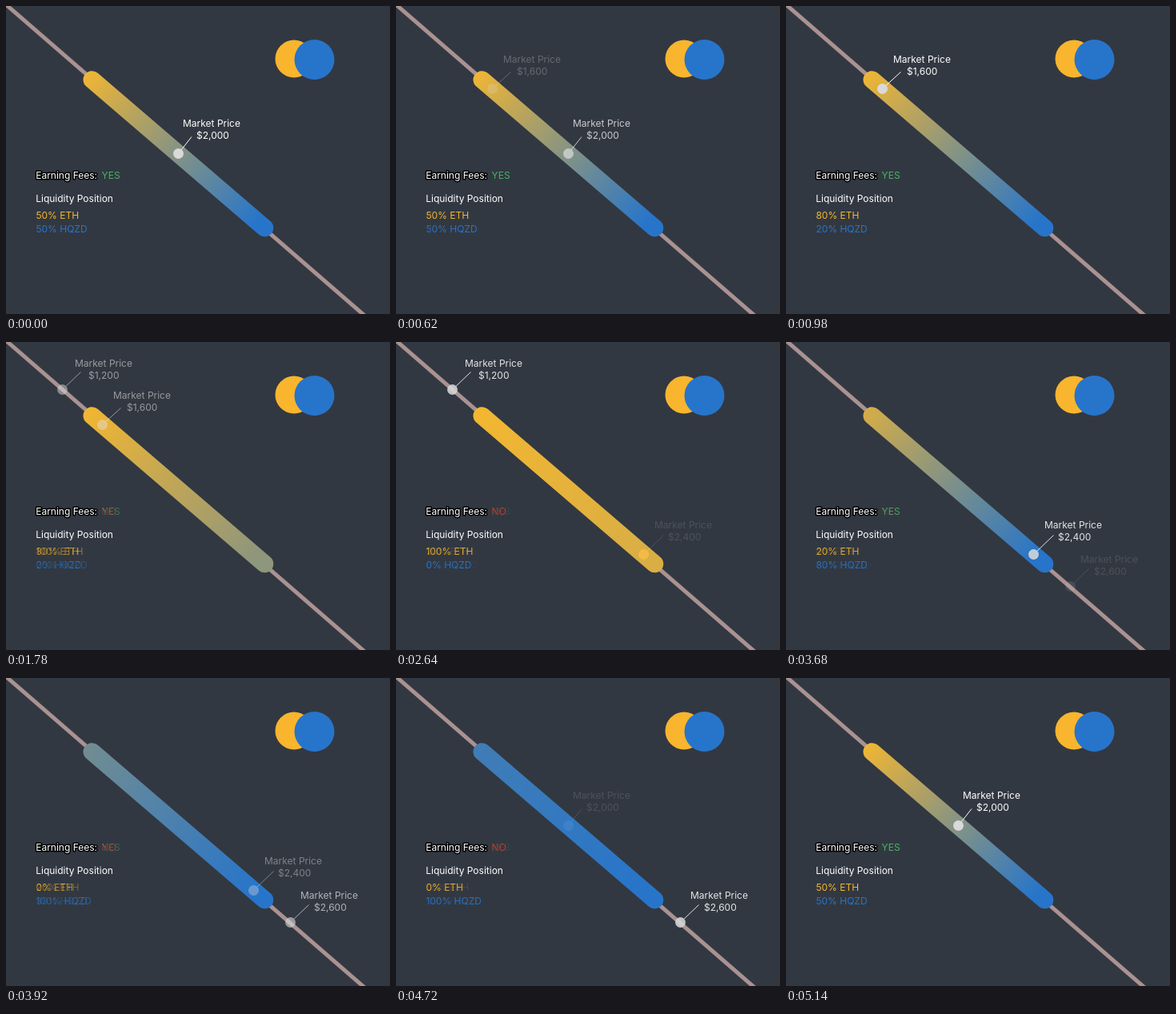
Write an HTML page with a canvas that moves like this. It is 480x385 px and loops after 5.2 s.

```html
<!DOCTYPE html>
<html lang="en">
<head>
<meta charset="utf-8">
<title>Liquidity range</title>
<style>
  html, body { margin: 0; width: 100%; height: 100%; overflow: hidden; background: #323841; }
  canvas { display: block; }
</style>
</head>
<body>
<canvas id="stage" width="480" height="385"></canvas>
<script>
const W = 480, H = 385;
const YELLOW = '#f4b731', BLUE = '#2775ca', GREEN = '#46b263', RED = '#c93a27';
const STATE_MS = 1040, HOLD_MS = 560, STEP_MS = 60, STEPS = 8;

// dot: marker centre, label: text origin, tip: outer end of the leader
const states = [
  { price: '$2,000', eth: 50,  dot: [215.5, 184.5], label: [221, 151], tip: [232, 163.5] },
  { price: '$1,600', eth: 80,  dot: [120.5, 103.5], label: [134, 71],  tip: [143.5, 82.5] },
  { price: '$1,200', eth: 100, dot: [70.5, 59.5],   label: [86, 31],   tip: [93.5, 37.5] },
  { price: '$2,400', eth: 20,  dot: [309.5, 265.5], label: [323, 233], tip: [334.5, 241.5] },
  { price: '$2,600', eth: 0,   dot: [355.5, 305.5], label: [368, 276], tip: [378.5, 283.5] }
];

const main = document.getElementById('stage').getContext('2d');
const layer = document.createElement('canvas');
layer.width = W;
layer.height = H;
const over = layer.getContext('2d');

function line(c, from, to, width, color, cap = 'butt') {
  c.lineWidth = width;
  c.strokeStyle = color;
  c.lineCap = cap;
  c.beginPath();
  c.moveTo(...from);
  c.lineTo(...to);
  c.stroke();
}

function disc(c, x, y, r, color) {
  c.fillStyle = color;
  c.beginPath();
  c.arc(x, y, r, 0, Math.PI * 2);
  c.fill();
}

function text(c, str, x, y, color = '#fff') {
  c.fillStyle = color;
  c.fillText(str, x, y);
}

function barColor(c, eth) {
  if (eth === 100) return YELLOW;
  if (eth === 0) return BLUE;
  const g = c.createLinearGradient(95, 81, 314, 269);
  g.addColorStop(0, YELLOW);
  g.addColorStop(1, BLUE);
  return g;
}

function drawState(c, { price, eth, dot, label: [x, y], tip }) {
  const earning = eth > 0 && eth < 100;
  c.fillStyle = '#323841';
  c.fillRect(0, 0, W, H);
  c.font = '12px Inter, sans-serif';
  c.lineJoin = 'round';

  line(c, [-9.5, -10], [457.5, 395], 5, '#aa9292');
  line(c, [107.5, 92.2], [323.3, 277.3], 22, barColor(c, eth), 'round');

  disc(c, 360, 66, 23.5, '#f9b52e');
  disc(c, 385.5, 67, 25, BLUE);

  line(c, tip, dot, 1, '#fff');
  disc(c, ...dot, 6.5, '#d9d9d9');
  text(c, 'Market Price', x, y);
  text(c, price, x + 17, y + 15);

  c.lineWidth = 3;
  c.strokeStyle = '#000';
  c.strokeText('Earning Fees:', 37.2, 216);
  text(c, 'Earning Fees:', 37.2, 216);
  text(c, earning ? 'YES' : 'NO', 119.6, 216, earning ? GREEN : RED);
  text(c, 'Liquidity Position', 37.2, 245);
  text(c, eth + '% ETH', 37.4, 266, YELLOW);
  text(c, 100 - eth + '% HQZD', 37.4, 283, BLUE);
}

function frame() {
  const t = performance.now() % (STATE_MS * states.length);
  const i = Math.floor(t / STATE_MS);
  const fade = t % STATE_MS - HOLD_MS;
  const mix = fade < 0 ? 0 : Math.min(STEPS, Math.floor(fade / STEP_MS) + 1) / STEPS;

  drawState(main, states[i]);
  if (mix > 0) {
    drawState(over, states[(i + 1) % states.length]);
    main.globalAlpha = mix;
    main.drawImage(layer, 0, 0);
    main.globalAlpha = 1;
  }
  requestAnimationFrame(frame);
}
frame();
</script>
</body>
</html>
```
